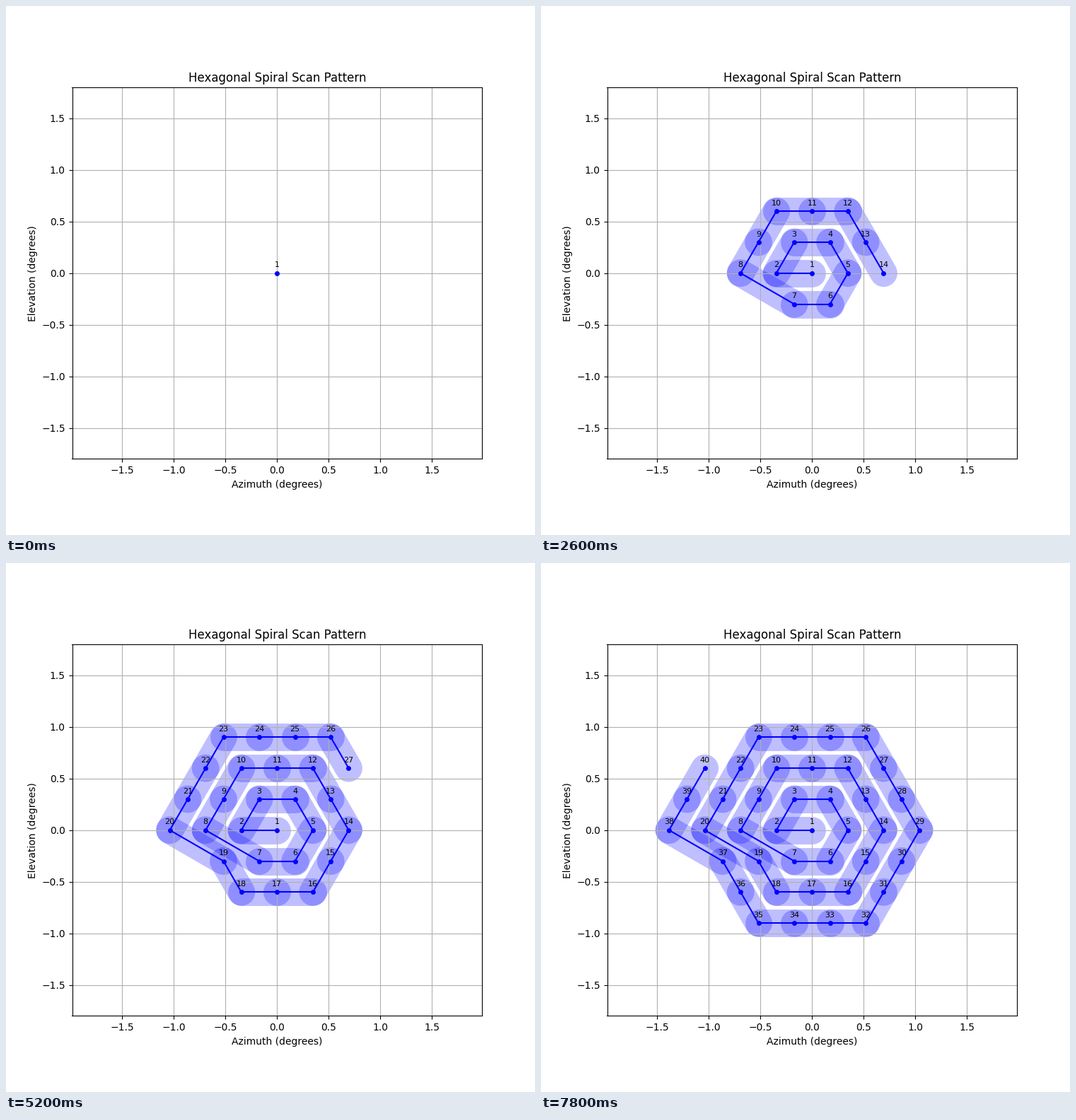
Animation, 748 px wide and 748 px high, one loop 8 s. Source, as a matplotlib script:

```python
import math

import matplotlib.pyplot as plt
from matplotlib.animation import FuncAnimation

SIZE, DPI = 748, 100
COUNT, STEP_MS = 40, 200
ROW = 0.3                        # elevation between rows
PITCH = 2 * ROW / math.sqrt(3)   # azimuth between neighbours
RINGS = 4


def corner(ring, i):
    """Corner i of a ring, clockwise from the far left."""
    angle = math.radians(180 - 60 * i)
    return ring * PITCH * math.cos(angle), ring * PITCH * math.sin(angle)


def spiral(rings):
    points = [(0.0, 0.0)]
    for ring in range(1, rings + 1):
        for side in range(6):
            (x0, y0), (x1, y1) = corner(ring, side), corner(ring, side + 1)
            for k in range(ring):
                u = k / ring
                points.append((x0 + (x1 - x0) * u, y0 + (y1 - y0) * u))
    return points


points = spiral(RINGS)[:COUNT]

fig, ax = plt.subplots(figsize=(SIZE / DPI, SIZE / DPI), dpi=DPI)
ax.set_aspect("equal")
ax.set_xlim(-RINGS * PITCH - 0.6, RINGS * PITCH + 0.6)
ax.set_ylim(-RINGS * ROW - 0.6, RINGS * ROW + 0.6)
ax.set_title("Hexagonal Spiral Scan Pattern")
ax.set_xlabel("Azimuth (degrees)")
ax.set_ylabel("Elevation (degrees)")
ax.grid(True)

steps = []
for n, (x, y) in enumerate(points):
    parts = ax.plot(x, y, "bo", markersize=4)
    parts.append(ax.annotate(str(n + 1), (x, y), xytext=(0, 6),
                             textcoords="offset points",
                             ha="center", fontsize=8))
    if n:
        px, py = points[n - 1]
        parts += ax.plot([px, x], [py, y], "b-", linewidth=1.5)
        parts += ax.plot([px, x], [py, y], "b-", linewidth=28, alpha=0.25,
                         solid_capstyle="round", zorder=1)
    steps.append(parts)


def draw(frame):
    for n, parts in enumerate(steps):
        for part in parts:
            part.set_visible(n <= frame)
    return [part for parts in steps for part in parts]


anim = FuncAnimation(fig, draw, frames=COUNT, interval=STEP_MS,
                     repeat=True, repeat_delay=0)
plt.show()
```
